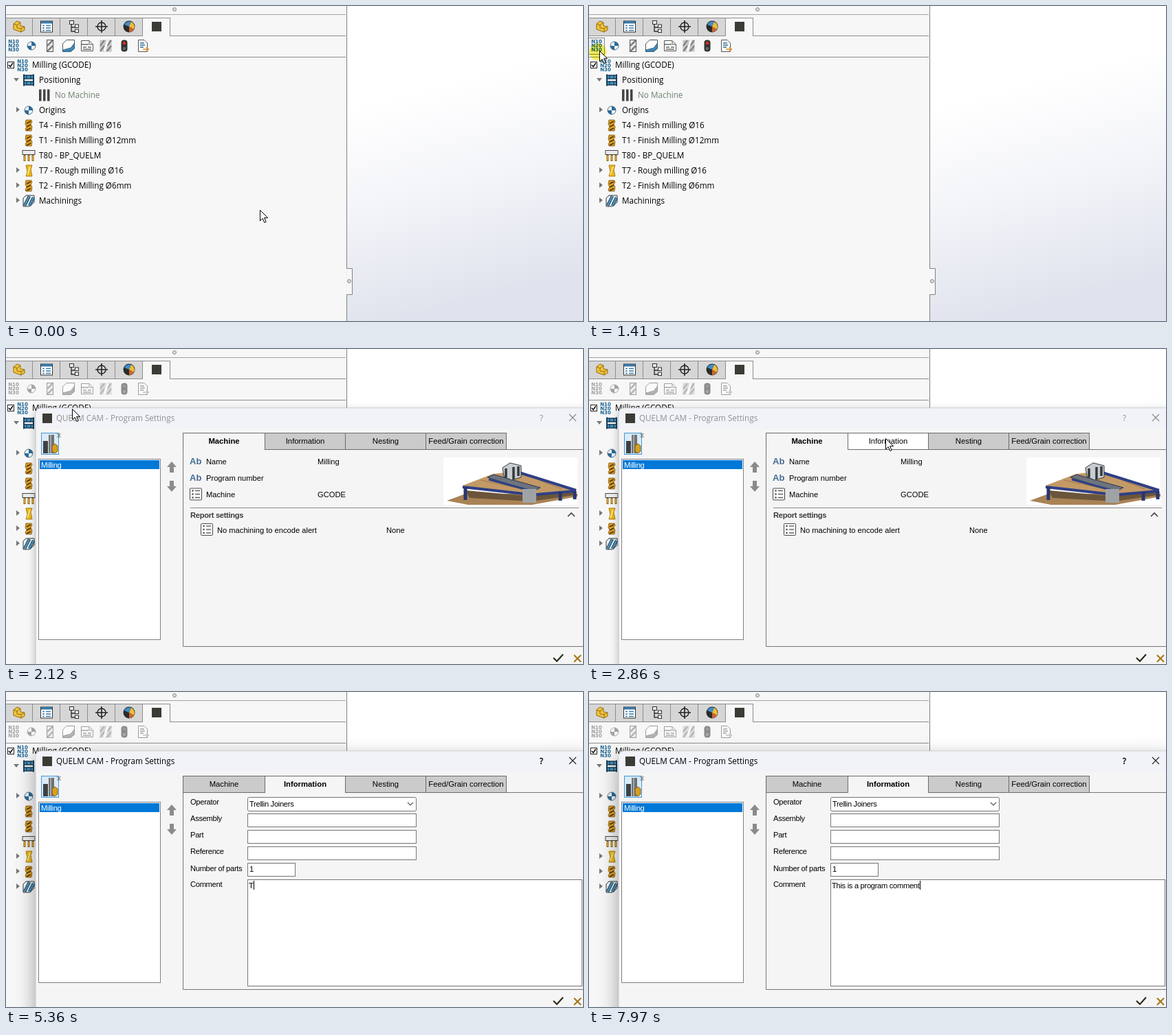
Write an HTML page that moves like this. It is 839x459 px and loops after 8000 ms.

```html
<!DOCTYPE html>
<html lang="en">
<head>
<meta charset="utf-8">
<title>Program settings</title>
<style>
html, body { margin: 0; width: 100%; height: 100%; overflow: hidden; background: #fff; }
svg { display: block; width: 839px; height: 459px; }
text { white-space: pre; }
.ui { font: 11.7px "Open Sans", sans-serif; }
.form { font: 11.15px "Liberation Sans", Arial, sans-serif; }
.tab { font-size: 11.3px; }
.tight { letter-spacing: -.3px; }
.bold { font-weight: bold; }
.mid { text-anchor: middle; }
.code { font: bold 7px "DejaVu Sans", sans-serif; fill: #17618f; }
.field { fill: #fff; stroke: #767676; }
.off { filter: grayscale(1); opacity: .55; }
#frame { filter: drop-shadow(0 10px 14px rgba(0,0,0,.36)); }
.idle #frame { filter: drop-shadow(0 4px 6px rgba(0,0,0,.25)); }
.idle .caption { fill: #929292; stroke: none; }
.idle .close { stroke: #888; }
#glow { fill: #fff200; opacity: .62; mix-blend-mode: multiply; }
</style>
</head>
<body>
<svg id="stage" viewBox="0 0 839 459"></svg>
<script>
const stage = document.getElementById('stage');

// Markup helpers
const text = (x, y, s, cls = 'form', more = '') => `<text x="${x}" y="${y}" class="${cls}" ${more}>${s}</text>`;
const box = (x, y, w, h, fill, more = '') => `<rect x="${x}" y="${y}" width="${w}" height="${h}" fill="${fill}" ${more}/>`;
const path = (d, fill = 'none', stroke = 'none', w = 1, more = '') =>
  `<path d="${d}" fill="${fill}" stroke="${stroke}" stroke-width="${w}" ${more}/>`;
const at = (x, y, s) => `<g transform="translate(${x} ${y})">${s}</g>`;
const disc = (x, y, r, fill, more = '') => `<circle cx="${x}" cy="${y}" r="${r}" fill="${fill}" ${more}/>`;

// Icons, each centred on 0,0
const ncode = ['N10', 'N20', 'N30'].map((s, i) => text(0, -3.4 + i * 6.1, s, 'code mid')).join('');
const origin = disc(0, 0, 6, '#eef3f7', 'stroke="#4b6f8b"') + path('M0 0V-6A6 6 0 0 1 6 0ZM0 0V6A6 6 0 0 1 -6 0Z', '#2d6a96');
const drill = box(-4.5, -8.5, 9, 17, '#e6e6e6', 'stroke="#555"') +
  path('M-4 0L4 -8M-4 8L4 0', 'none', '#777', 2.4);
const goldTool = path('M-4 -8H4L5 -5L3 -2L5 2L4 8H-4L-5 5L-3 2L-5 -2Z', '#dd9d1f', '#6b4a12', .7) +
  path('M-3 -3L3 -6M-3 2L3 -1M-3 7L3 4', 'none', '#4b3410', 1.5);
const roughTool = path('M-4 -8H5L3 -2L5 8H-4L-2 1Z', '#e9b71d', '#a97c10') + path('M-2 6L2 -6', 'none', '#fbe27a', 2);
const page = path('M-8.5 -7.5H3L8.5 -2V7.5H-8.5Z', '#fff', '#555') + path('M3 -7V-2H8', 'none', '#555') +
  path('M-8 -2H2M-6 2H-1M1 2H6M-6 5H6', 'none', '#666', 1.4);
const solid = path('M-8.5 -3L-3 -8.5H8.5V4L3 8.5H-8.5Z', '#fff', '#4a5760') +
  path('M-8.5 8.5V6L3 3L8.5 -4V4L3 8.5Z', '#3f87b8', '#35566b', .7);
const hatch = box(-8.5, -8.5, 17, 17, '#c4c4c4') + path('M-8 0L-2 -8M-8 8L-2 0M2 0L8 -8M2 8L8 0', 'none', '#777', 2) +
  path('M-2 8L3 -8', 'none', '#fff', 3);
const light = box(-4.5, -8.5, 9, 17, '#333', 'rx="4"') + disc(0, -4, 2.3, '#d92f24') + disc(0, 4, 2.3, '#56705a');
const report = path('M-6.5 -8.5H2L6.5 -4V8.5H-6.5Z', '#fff', '#555') + path('M-4 -4H2M-4 -1H3M-4 2H1', 'none', '#2d6a96', 1.5) +
  path('M0 5H8M5 2L8 5L5 8', 'none', '#d98a2b', 1.7);
const rack = box(-7, -7, 14, 5, '#4d91b9') + box(-7, 2, 14, 5, '#4d91b9') +
  path('M-7 -8.5V8.5M7 -8.5V8.5', 'none', '#173f5b', 2) +
  path('M-8 -7H8M-8 -2H8M-8 2H8M-8 7H8M-3 -7V-2M3 -7V-2M-3 2V7M3 2V7', 'none', '#173f5b', 1.3);
const bars = [-8, -2, 4].map(x => box(x, -8.5, 3.5, 17, '#444')).join('');
const drills = box(-9, -7.5, 18, 6, '#ededed', 'stroke="#444"') + path('M-6 -1V8M0 -1V8M6 -1V8', 'none', '#80601f', 3) +
  path('M-6 0V7M0 0V7M6 0V7', 'none', '#e0a52d', 1.6);
const mill = path('M-8 8V-4L-4 -8H8V2L1 8Z', '#f2f6f8', '#333') + path('M-6 7L1 -7M1 7L7 -5', 'none', '#1d3c50', 4.4) +
  path('M-6 7L1 -7M1 7L7 -5', 'none', '#4d93bd', 2.6);
const list = box(-8.5, -8.5, 17, 17, '#fafafa', 'stroke="#4a4a4a" rx="1"') +
  [-5, 0, 5].map(y => disc(-4.5, y, 1.3, '#555') + path(`M-1 ${y}H6`, 'none', '#555', 1.3)).join('');
const logo = box(-7, -7, 14, 14, '#3d3b36');
const part = path('M-8 -4L-3 -8L2 -6V-1L8 0V5L3 8L-8 4Z', '#f2c43c', '#8f6a12') +
  path('M-8 -4L-3 -2V2L3 3V8M-3 -2L2 -6M3 3L8 0', 'none', '#8f6a12');
const table = box(-8.5, -8, 17, 16, '#fff', 'stroke="#333"') + box(-8, -8, 16, 3.5, '#3879a8') +
  path('M-6 -1.5H-3M-6 2H-3M-6 5.5H-3M-1 -1.5H6M-1 2H6M-1 5.5H6', 'none', '#3879a8', 1.6);
const treeIcon = path('M-4 -4V7H1M-4 1H1', 'none', '#333', 1.4) + box(-6.5, -8.5, 6, 5, '#eee', 'stroke="#333"') +
  [-3, 4].map(y => box(1.5, y, 5, 4.5, '#eee', 'stroke="#333"')).join('');
const target = disc(0, 0, 6, 'none', 'stroke="#222" stroke-width="1.4"') + path('M-9 0H9M0 -9V9', 'none', '#222', 1.6);
const ball = disc(0, 0, 8.5, '#2b2b2b') + path('M0 0L-7 -3A8 8 0 0 1 3 -7Z', '#3f8fc9') +
  path('M0 0L3 -7A8 8 0 0 1 7 4Z', '#f3bd38') + path('M0 0L7 4A8 8 0 0 1 0 8Z', '#c9682f');

// Side panel
const tabIcons = [part, table, treeIcon, target, ball, logo];
const tools = [origin, drill, solid, page, hatch, light, report];
const rows = [
  ['Positioning', rack, 'open'], null, ['Origins', origin, 'shut'],
  ['T4 - Finish milling Ø16', goldTool], ['T1 - Finish Milling Ø12mm', goldTool], ['T80 - BP_QUELM', drills],
  ['T7 - Rough milling Ø16', roughTool, 'shut'], ['T2 - Finish Milling Ø6mm', goldTool, 'shut'], ['Machinings', mill, 'shut']
];
const arrows = { open: path('M11 -3H19L15 2Z', '#777'), shut: path('M15 -5L20 -1L15 3Z', '#777') };
const tree = rows.map((r, i) => r ? at(0, 108 + i * 22,
  (arrows[r[2]] || '') + at(33, 0, r[1]) + text(48, 4, r[0], 'ui')) : '').join('');

const panel = `<defs><linearGradient id="sky" gradientUnits="userSpaceOnUse" x1="560" y1="130" x2="640" y2="440">
  <stop stop-color="#fff"/><stop offset=".45" stop-color="#f4f5f9"/><stop offset="1" stop-color="#e0e3ed"/></linearGradient></defs>` +
  box(0, 0, 839, 459, 'url(#sky)') + box(0, 0, 495, 459, '#f7f7f7') +
  path('M495.5 0V382.5H503.5V420.5H495.5V459', '#f7f7f7', '#828282') + disc(499, 401, 2.5, '#ddd', 'stroke="#888"') +
  disc(245, 5, 2.5, '#ddd', 'stroke="#888"') + path('M0 12.5H494', 'none', '#a5a5a5') +
  tabIcons.map((icon, i) => box(i * 40 - 1.5, 17.5, 40, 26, i < 5 ? '#d6d6d6' : '#f7f7f7', 'stroke="#8d8d8d"') +
    at(i * 40 + 19, 30, icon)).join('') +
  box(199, 42, 39, 3, '#f7f7f7') + path('M238 43.5H494M0 74.5H494', 'none', '#8d8d8d') +
  box(-.5, 46.5, 23, 24, '#efefef', 'id="hover" stroke="#8a8a8a"') +
  `<g id="tools">${at(11, 57, ncode)}${tools.map((s, i) => at(37 + i * 27, 58, s)).join('')}</g>` +
  box(2.5, 81.5, 9, 9, '#fff', 'stroke="#222"') + path('M4 86L6.2 88.5L10 83', 'none', '#111', 1.6) +
  at(24, 86, ncode) + text(38, 90, 'Milling (GCODE)', 'ui') +
  at(56, 130, bars) + text(71, 134, 'No Machine', 'ui', 'fill="#6f8070"') + tree;

// Dialog
const edges = [257.5, 376.5, 493.5, 610.5, 727.5];
const tabs = chosen => ['Machine', 'Information', 'Nesting', 'Feed/Grain correction'].map((s, i) => {
  const x = edges[i], w = edges[i + 1] - x, on = i === chosen;
  return box(x, 122.5, w, 24, on ? '#f5f5f5' : '#cbcbcb', `stroke="#6b6b6b" ${!on && i === 1 ? 'id="hotTab"' : ''}`) +
    (on ? box(x + .5, 145, w - 1, 3, '#f5f5f5') : '') +
    text(x + w / 2, 138, s, on ? 'form tab mid bold' : 'form tab mid');
}).join('');

const picture = box(636, 158, 195, 69, '#fff') +
  path('M641 221L668 211H831V215L765 227H672Z', '#a98355') + path('M668 206L757 214L826 207V213L765 222L674 217Z', '#6b553a') +
  path('M664 199L708 182L745 178L829 206L757 212Z', '#c39a66') +
  path('M690 191L765 207M752 182L808 204', 'none', '#a17a4a') +
  path('M664 201L753 211M771 212L829 207M743 179L829 206', 'none', '#2f3f86', 4) +
  path('M668 201V220M806 208V221M827 207V219', 'none', '#28356f', 5) +
  path('M700 187L709 183L777 202L765 208Z', '#6d747c', '#2c3554') + path('M702 190L765 207', 'none', '#2f3f86', 3) +
  path('M722 173L733 166L749 170V187L735 191L724 186Z', '#c9cdd0', '#33383d') +
  path('M727 174V187M738 172V190M745 171V185', 'none', '#33383d', 3.5) + box(751, 204, 20, 20, '#a0a3a6');

const machine = tabs(0) +
  [168, 192].map(y => text(267, y, 'Ab', 'form bold', 'style="font-size:13px" fill="#466c94"')).join('') +
  text(291, 168, 'Name') + text(453, 168, 'Milling') + text(291, 192, 'Program number') +
  at(276, 211.5, list) + text(291, 216, 'Machine') + text(453, 216, 'GCODE') + picture +
  path('M268 231.5H833', 'none', '#8a8a8a') + text(268, 246, 'Report settings', 'form bold tight', 'fill="#3b3b3b"') +
  path('M817 244L822 239L827 244', 'none', '#444', 1.7) +
  at(292, 263, list) + text(307, 268, 'No machining to encode alert') + text(553, 268, 'None');

const field = (y, w, h, more = '') => box(351.5, y + .5, w, h, '#fff', `class="field" ${more}`);
const labels = [['Operator', 164], ['Assembly', 188], ['Part', 212], ['Reference', 236], ['Number of parts', 261], ['Comment', 284]];
const info = tabs(1) + labels.map(([s, y]) => text(268, y, s, 'form tight')).join('') +
  field(153, 245, 20, 'rx="2"') + [177, 201, 225].map(y => field(y, 245, 19)).join('') + field(249, 69, 19) + field(273, 486, 155) +
  text(354, 167, 'Trellin Joiners', 'form tight') + path('M584 161L588 165L592 161', 'none', '#555', 1.2) +
  text(354, 262, '1') + text(353, 286, '', 'form tight', 'id="note"') + box(353, 275, 1, 13, '#000', 'id="caret"');

const newButton = box(51.5, 122.5, 25, 31, '#cfe6f8', 'stroke="#4a9ad4"') + path('M53 124H70L76 130V152H53Z', '#dcebf6') +
  box(54, 134, 7, 18, '#3f4144') + box(62, 125, 8, 27, '#6f7275') + box(64, 125, 2, 27, '#a4a7a9') +
  path('M67 141L71 138L75 141V149L71 152L67 149Z', '#d6a01e', '#6b4f12', .8) +
  path('M74 123L80 129M80 123L74 129M77 122V130', 'none', '#666', .8);
const arrow = 'M0 -8L7 0H3V8H-3V0H-7Z';

const dialog = box(43, 86, 804, 386, '#f5f5f5', 'id="frame" rx="8" stroke="#c4c6c9"') +
  path('M43.5 116V94A8 8 0 0 1 51 86.5H839A8 8 0 0 1 846.5 94V116Z', '#f1f3f8') +
  at(60, 101, logo) + text(73, 105, 'QUELM CAM - Program Settings', 'ui caption') +
  text(776, 105, '?', 'ui caption', 'stroke="#000" stroke-width=".4"') +
  path('M819 95L829 105M829 95L819 105', 'none', '#222', 1.1, 'class="close"') + newButton +
  box(47.5, 160.5, 177, 263, '#fff', 'stroke="#7c8084"') + box(49, 162, 174, 13, '#0078d7') +
  text(51, 173, 'Milling', 'form tight', 'fill="#fff"') +
  at(241, 172, path(arrow, '#8b8b8b')) + at(241, 200, path(arrow, '#8b8b8b', 'none', 1, 'transform="rotate(180)"')) +
  path('M257.5 146.5H842.5V433.5H257.5Z', '#f5f5f5', '#777') +
  `<g id="machine">${machine}</g><g id="info">${info}</g>` +
  path('M796 450L801 455L810 445', 'none', '#2a2a1c', 2.2) + path('M826 446L836 456M836 446L826 456', 'none', '#a8781b', 2.2);

const pointer = path('M.5 .5V16L4.2 12.6L6.8 18.6L9.2 17.5L6.6 11.7H11.6Z', '#fff', '#000', 1, 'id="pointer"');
const beam = path('M-3 -7.5H-1L0 -6.5L1 -7.5H3M0 -6.5V6.5M-3 7.5H-1L0 6.5L1 7.5H3', 'none', '#000', 1, 'id="beam"');
stage.innerHTML = panel + `<g id="dialog">${dialog}</g>` + disc(0, 0, 12.5, '#fff200', 'id="glow"') +
  `<g id="mouse">${pointer}${beam}</g>`;

// Timeline
const el = {};
stage.querySelectorAll('[id]').forEach(e => el[e.id] = e);
const show = (e, on) => e.style.display = on ? '' : 'none';
const clamp = u => Math.max(0, Math.min(1, u));
const smooth = u => u * u * (3 - 2 * u);
const linear = u => u;
const out = u => Math.sin(u * Math.PI / 2);

const moves = [ // start, end, x, y, easing
  [330, 1230, 15, 65, smooth], [2000, 2120, 95, 87, linear], [2120, 2820, 431, 130, out],
  [3340, 4100, 415, 294, smooth], [4430, 4620, 402, 348, smooth]
];
const clicks = [[1380, 1540], [3160, 3300], [4300, 4430]];

const comment = 'This is a program comment';
const runs = [ // first key, last key, number of keys
  [5360, 5360, 1], [5510, 6240, 9], [6370, 6370, 1], [6530, 6700, 3], [6880, 7320, 6], [7520, 7520, 1], [7670, 7970, 4]
];
const keys = runs.flatMap(([a, b, n]) => Array.from({ length: n }, (_, i) => a + (n > 1 ? (b - a) * i / (n - 1) : 0)));

function mouseAt(t) {
  let x = 369, y = 297;
  for (const [a, b, x2, y2, ease] of moves) {
    const k = ease(clamp((t - a) / (b - a)));
    x += (x2 - x) * k;
    y += (y2 - y) * k;
  }
  return [Math.round(x), Math.round(y)];
}

function draw(now) {
  const t = now % 8000;
  const [x, y] = mouseAt(t);
  const onInfo = t >= 3240;

  show(el.hover, t >= 1150 && t < 2000);
  el.tools.classList.toggle('off', t >= 1600);

  const grow = 1 - (1 - clamp((t - 1700) / 240)) ** 3;
  const scale = .885 + .115 * grow;
  show(el.dialog, t >= 1700);
  el.dialog.setAttribute('transform', `translate(${386 * (1 - scale)} ${234 * (1 - scale)}) scale(${scale})`);
  el.dialog.style.opacity = clamp((t - 1690) / 70);
  el.dialog.classList.toggle('idle', t >= 2000 && t < 3240);
  show(el.machine, !onInfo);
  show(el.info, onInfo);
  el.hotTab.setAttribute('fill', x > 376 && y > 122 && y < 147 && t > 2000 ? '#fff' : '#cbcbcb');

  const typed = keys.filter(k => k <= t).length;
  el.note.textContent = comment.slice(0, typed);
  show(el.caret, t >= 4370 && (t < 4900 || t >= 5360));
  el.caret.setAttribute('x', Math.round(353 + (typed ? el.note.getComputedTextLength() + .5 : 0)));

  const writing = onInfo && x > 351 && y > 274;
  show(el.mouse, t < 5360);
  show(el.pointer, !writing);
  show(el.beam, writing);
  el.mouse.setAttribute('transform', `translate(${x} ${y})`);
  show(el.glow, clicks.some(([a, b]) => t >= a && t < b));
  el.glow.setAttribute('cx', x - 2);
  el.glow.setAttribute('cy', y + 2);
}

function tick() {
  draw(performance.now());
  requestAnimationFrame(tick);
}
tick();
</script>
</body>
</html>
```
